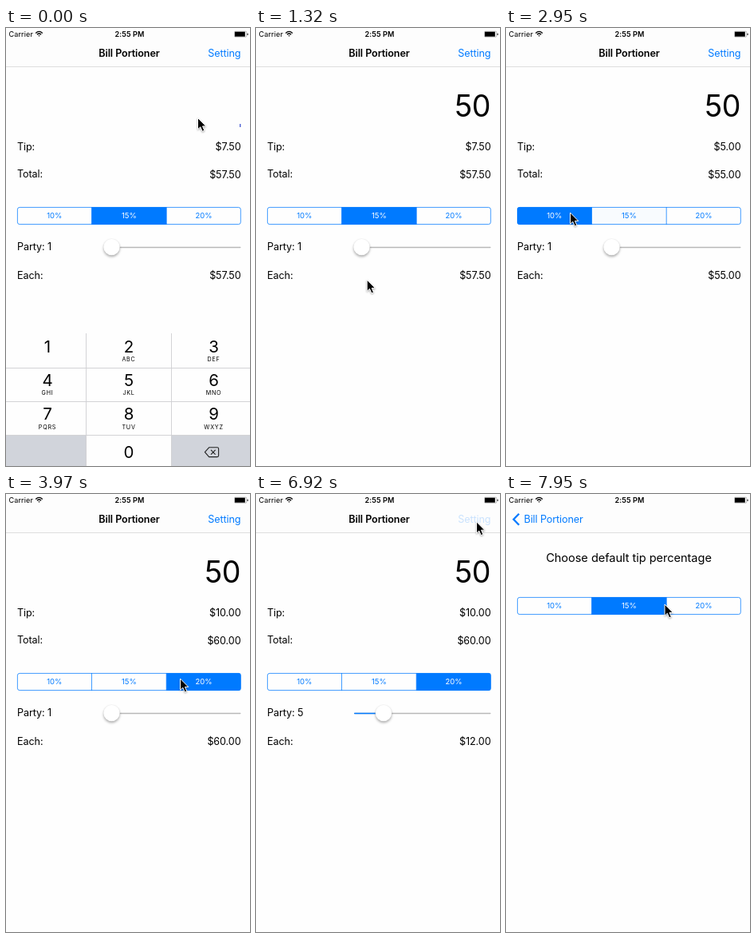
These frames come from a looping animation (306 px wide and 548 px high, 8000 ms). An HTML page:

```html
<!DOCTYPE html>
<html lang="en">
<head>
<meta charset="utf-8">
<title>Bill Portioner</title>
<style>
  html, body { margin: 0; width: 100%; height: 100%; overflow: hidden; background: #fefefe; }
  svg { display: block; width: 100vw; height: 100vh; font: 12.6px Inter, Roboto, sans-serif; letter-spacing: -.1px; }
  .blue { fill: #007aff; }
  .mid { text-anchor: middle; }
  .end { text-anchor: end; }
  .title { font-weight: 600; }
  .small { font-size: 9.1px; letter-spacing: .1px; }
  .seg text { font-size: 9.5px; letter-spacing: 0; text-anchor: middle; }
  .digit { font-size: 20.5px; letter-spacing: 0; text-anchor: middle; }
  .letters { font-size: 7.2px; letter-spacing: .75px; text-anchor: middle; }
  #thumb { filter: drop-shadow(0 2px 1.6px rgba(0, 0, 0, .3)); }
  #cursor { filter: drop-shadow(.5px 1px .8px rgba(0, 0, 0, .35)); }
</style>
</head>
<body>
<svg viewBox="0 0 306 548" preserveAspectRatio="none">
  <rect width="306" height="548" fill="#fefefe"/>

  <g id="main">
    <text id="amount" class="end" x="293.6" y="110.6" font-size="37.5" letter-spacing="-.7">50</text>
    <rect id="caret" x="293" y="120" width="1.4" height="4" fill="#4b5fd3"/>
    <text x="14" y="153">Tip:</text>
    <text id="tip" class="end" x="294.5" y="153"/>
    <text x="14" y="187">Total:</text>
    <text id="total" class="end" x="294.5" y="188"/>
    <g id="rates" class="seg" transform="translate(0 224)"></g>
    <text id="party" x="14" y="278"/>
    <rect x="123" y="273.7" width="171.5" height="1.5" rx=".7" fill="#b8b8b8"/>
    <rect id="fill" class="blue" x="123" y="273.7" height="1.5" rx=".7"/>
    <circle id="thumb" cy="274" r="10.3" fill="#fff" stroke="#000" stroke-opacity=".08" stroke-width=".5"/>
    <text x="14" y="314">Each:</text>
    <text id="each" class="end" x="294.5" y="314"/>
  </g>

  <g id="keys"></g>

  <g id="settings">
    <rect y="49" width="306" height="499" fill="#fefefe"/>
    <text class="mid" x="154" y="85" font-size="14.6" letter-spacing="-.05">Choose default tip percentage</text>
    <g id="defaults" class="seg" transform="translate(0 129)"></g>
  </g>

  <rect width="306" height="48" fill="#fdfdfd"/>
  <rect y="48" width="306" height="1" fill="#dedede"/>
  <text id="title" class="mid title" y="35.7">Bill Portioner</text>
  <g id="back">
    <path d="M16.3 24.8 9.5 31.8 16.3 38.8" fill="none" stroke="#007aff" stroke-width="2.3"/>
    <text id="backText" class="blue" y="35.7">Bill Portioner</text>
  </g>
  <text id="setting" class="blue end" x="294.5" y="35.7">Setting</text>

  <text class="small" x="3.5" y="11">Carrier</text>
  <g fill="none" stroke="#000" stroke-width="1.3">
    <path d="M37.2 6.4Q41.5 2.4 45.8 6.4M38.9 8.2Q41.5 5.9 44.1 8.2"/>
    <path d="M40.2 9.2h2.6L41.5 10.8Z" fill="#000" stroke="none"/>
  </g>
  <text class="small mid" x="155" y="11" font-weight="600">2:55 PM</text>
  <rect x="286.5" y="4.2" width="15.2" height="7" rx="1" fill="none" stroke="#000" stroke-opacity=".4" stroke-width=".6"/>
  <rect x="287" y="4.7" width="12.8" height="6"/>
  <rect x="302.5" y="6.4" width="1" height="2.6" rx=".5"/>

  <path id="cursor" d="M0 0V14.3L3.3 11.3 5.7 16.8 8.3 15.7 6 10.4H10.3Z" stroke="#fff" stroke-width="1" stroke-linejoin="round"/>
</svg>
<script>
const LOOP = 8000, STEP = 147.2;
const $ = id => document.getElementById(id);
const clamp = v => Math.min(1, Math.max(0, v));
const mix = (a, b, k) => a + (b - a) * k;
const smooth = k => k * k * (3 - 2 * k);
const show = (id, on) => $(id).setAttribute('display', on ? 'inline' : 'none');
const move = (id, x, y = 0) => $(id).setAttribute('transform', `translate(${x} ${y})`);
const money = v => '$' + v.toFixed(2);

const edges = [14, 107.5, 201.2, 294.7];
const rates = [10, 15, 20];

// Builds a segmented control and returns a painter taking one fill level per segment.
function segments(id) {
  const cells = rates.map((r, i) =>
    `<rect class="blue" x="${edges[i]}" width="${edges[i + 1] - edges[i]}" height="22"/>`);
  const labels = rates.map((r, i) =>
    `<text x="${(edges[i] + edges[i + 1]) / 2}" y="14.2">${r}%</text>`);
  $(id).innerHTML = `<clipPath id="${id}Clip"><rect x="14" width="280.7" height="22" rx="3"/></clipPath>
    <g clip-path="url(#${id}Clip)">${cells.join('')}</g>
    <g fill="none" stroke="#007aff" stroke-width=".75">
      <path d="M${edges[1]} 0v22M${edges[2]} 0v22"/>
      <rect x="14.4" y=".4" width="279.9" height="21.2" rx="2.7"/>
    </g>${labels.join('')}`;
  const rects = $(id).querySelectorAll('.blue'), texts = $(id).querySelectorAll('text');
  return levels => levels.forEach((v, i) => {
    rects[i].setAttribute('opacity', v);
    texts[i].setAttribute('fill', v > .5 ? '#fff' : '#007aff');
  });
}

function buildKeys() {
  const cols = [52, 154, 260.5];
  const letters = ['', 'ABC', 'DEF', 'GHI', 'JKL', 'MNO', 'PQRS', 'TUV', 'WXYZ'];
  const digits = letters.map((s, i) => {
    const x = cols[i % 3], y = 405.8 + Math.floor(i / 3) * 42.2;
    return `<text class="digit" x="${x}" y="${y}">${i + 1}</text><text class="letters" x="${x}" y="${y + 11.4}">${s}</text>`;
  });
  $('keys').innerHTML = `<rect y="382" width="306" height="166" fill="#fefefe"/>
    <path d="M0 510H100.5V548H0ZM207.5 510H306V548H207.5Z" fill="#d1d4db"/>
    <path d="M0 425.5H306M0 467.5H306M0 509.5H306M100.5 382V548M207.5 382V548" stroke="#cfcfd2" stroke-width=".9"/>
    ${digits.join('')}<text class="digit" x="154" y="538">0</text>
    <path d="M254.6 524.8H265Q266.6 524.8 266.6 526.4V535Q266.6 536.6 265 536.6H254.6L249.4 530.7ZM257 527.8l5.6 5.8M262.6 527.8l-5.6 5.8" fill="none" stroke="#222" stroke-width="1.1" stroke-linejoin="round"/>`;
}

// Pointer stops: time, x, y
const stops = [
  [0, 240.5, 112.5], [1030, 139.2, 315], [1330, 139.2, 315], [2500, 80.5, 231],
  [3090, 80.5, 231], [3680, 218.5, 231], [3980, 218.5, 231], [4600, 125.5, 267.3],
  [4750, 125.5, 267.3], [5450, 151, 267.3], [5740, 153, 267.3], [5890, 153, 267.3],
  [6630, 276.5, 34.8], [7210, 276.5, 34.8], [7940, 199, 138]
];
function pointer(t) {
  const i = stops.findIndex(s => s[0] > t);
  if (i < 0) return stops[stops.length - 1].slice(1);
  const [a, b] = [stops[i - 1], stops[i]];
  const k = smooth((t - a[0]) / (b[0] - a[0]));
  return [mix(a[1], b[1], k), mix(a[2], b[2], k)];
}

const paintRates = segments('rates');
segments('defaults')([0, 1, 0]);
buildKeys();

const TAP_10 = 2790, TAP_20 = 3675, GRAB = 4750, DROP = 5800, PRESS = 6900, PUSH = 7060;

function render(time) {
  const t = Math.floor((time + 8) / STEP) * STEP;
  const [x, y] = pointer(t);
  move('cursor', x, y);

  const typing = t < 1320;
  show('keys', typing);
  show('amount', !typing);
  show('caret', t < 440);

  const picked = t < TAP_10 ? 1 : t < TAP_20 ? 0 : 2;
  const fade = tap => .6 * clamp(1 - (t - tap) / 160);
  const levels = rates.map((r, i) => i === picked ? 1 : 0);
  if (picked === 0) levels[1] = fade(TAP_10);
  if (picked === 2) levels[0] = fade(TAP_20);
  paintRates(levels);

  const drag = t < GRAB ? 0 : t < DROP ? x - 125.5 : 27.5;
  const party = 1 + Math.round(drag / 7);
  const tip = 50 * rates[picked] / 100;
  $('thumb').setAttribute('cx', 132.5 + drag);
  $('fill').setAttribute('width', 9.5 + drag);
  $('tip').textContent = money(tip);
  $('total').textContent = money(50 + tip);
  $('party').textContent = 'Party: ' + party;
  $('each').textContent = money((50 + tip) / party);

  const p = 1 - (1 - clamp((t - PUSH) / 560)) ** 3;
  move('main', -92 * p);
  move('settings', 306 * (1 - p));
  show('settings', p > 0);
  $('title').setAttribute('x', mix(154.5, 62, p));
  $('title').setAttribute('opacity', clamp(1 - p * 1.6));
  $('back').setAttribute('opacity', p);
  $('backText').setAttribute('x', mix(113, 22.5, p));
  $('setting').setAttribute('opacity', (t > PRESS ? .2 : 1) * (1 - p));
}

const start = performance.now();
function frame() {
  render((performance.now() - start) % LOOP);
  requestAnimationFrame(frame);
}
frame();
</script>
</body>
</html>
```
